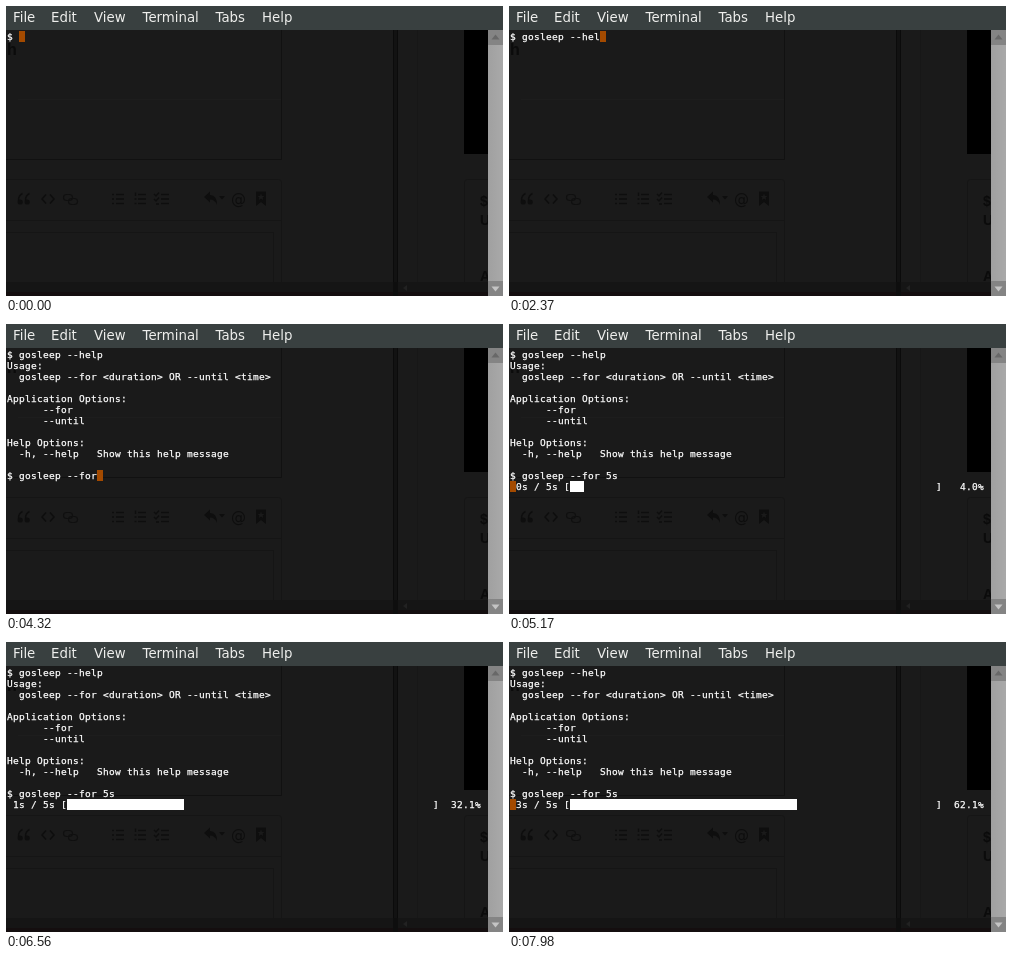
Recreate the animation shown at these times as an HTML page with a canvas. Size 497 by 290 pixels, loop 8000 ms.

```html
<!DOCTYPE html>
<html lang="en">
<head>
<meta charset="utf-8">
<title>Terminal</title>
<style>
  html, body { margin: 0; width: 100%; height: 100%; overflow: hidden; background: #1a1a1a; }
  svg, canvas { position: absolute; left: 0; top: 0; width: 497px; height: 290px; display: block; }
  .menu { font: 13.33px "DejaVu Sans", sans-serif; fill: #eeeeec; }
  .ghost { font-family: "Liberation Sans", Arial, sans-serif; font-weight: bold; fill: #0b0b0b; }
  .edge { fill: none; stroke: #151515; }
  .icon { fill: none; stroke: #0e0e0e; stroke-width: 1.5; }
  .thin { stroke: #101010; stroke-width: 1.2; }
  .solid { fill: #0e0e0e; }
</style>
</head>
<body>
<svg viewBox="0 0 497 290">
  <defs>
    <linearGradient id="thumb">
      <stop offset="0" stop-color="#a0a0a0"/>
      <stop offset="1" stop-color="#a9a9a9"/>
    </linearGradient>
  </defs>
  <rect width="497" height="290" fill="#1a1a1a"/>

  <!-- Window showing through the terminal -->
  <path class="edge" d="M0 173.5H272.5Q275.5 173.5 275.5 176.5V276M0 214.5H275M0 226.5H267.5V276"/>
  <path d="M0 153.5H275.5V24" fill="none" stroke="#111"/>
  <path d="M12 93.5H275" stroke="#1d1d1d"/>
  <text class="ghost" x="1" y="49" font-size="16">h</text>
  <rect x="387" y="24" width="5" height="266" fill="#121212"/>
  <path d="M387.5 24V290M391.5 24V290" stroke="#0b0b0b"/>
  <path d="M411.5 24V276" stroke="#171717"/>
  <rect x="458" y="24" width="24" height="124" fill="#000"/>
  <path class="edge" d="M482 173.5H461.5Q458.5 173.5 458.5 176.5V276"/>
  <g class="ghost" font-size="14">
    <text x="474" y="200">$</text>
    <text x="474" y="219">U</text>
    <text x="474" y="275">A</text>
  </g>
  <rect y="276" width="482" height="10" fill="#151515"/>
  <rect y="286" width="482" height="4" fill="#140e0f"/>
  <rect x="387" y="276" width="5" height="14" fill="#0e0e0e"/>
  <path d="M401 279V285L397 282Z" fill="#222"/>

  <!-- Editor toolbar -->
  <path class="icon" d="M16.5 187.5Q12 190 12.5 195M23.5 187.5Q19 190 19.5 195"/>
  <g class="solid">
    <circle cx="14.2" cy="196" r="2.6"/>
    <circle cx="21.2" cy="196" r="2.6"/>
  </g>
  <path class="icon" d="M40 188.5L36 193L40 197.5M44 188.5L48 193L44 197.5"/>
  <g class="icon thin">
    <rect x="57.5" y="188.5" width="9" height="6" rx="3"/>
    <rect x="62.5" y="192.5" width="9" height="6" rx="3"/>
  </g>
  <path class="icon" d="M110 188.5H118M110 193H118M110 197.5H118M132 188.5H140M132 193H140M132 197.5H140M155 188.5H163M155 193H163M155 197.5H163"/>
  <path class="icon" d="M106 188.5H108M106 193H108M106 197.5H108M129.5 186.5V190M128.5 193H130.5M128.5 197.5H130.5M148 188L150 190L153 186.5M148 193L150 195L153 191.5M150 198H153"/>
  <path class="solid" d="M198 191L204 185.5V189Q211 189 211 199Q209 193.5 204 193.5V196.5ZM213 190H219L216 193.5Z"/>
  <text class="solid" x="225" y="198" font-family="DejaVu Sans, sans-serif" font-size="15">@</text>
  <path class="solid" d="M250 185.5H260V200L255 196L250 200Z"/>
  <path d="M255 187.5L256 190H258.5L256.5 191.5L257.2 194L255 192.5L252.8 194L253.5 191.5L251.5 190H254Z" fill="#1a1a1a"/>

  <!-- Menu and scrollbar -->
  <rect width="497" height="24" fill="#394040"/>
  <g class="menu">
    <text x="7" y="16">File</text>
    <text x="45" y="16">Edit</text>
    <text x="88" y="16">View</text>
    <text x="136.5" y="16">Terminal</text>
    <text x="209.5" y="16">Tabs</text>
    <text x="256" y="16">Help</text>
  </g>
  <rect x="482" y="24" width="15" height="266" fill="#848484"/>
  <rect x="482" y="39" width="15" height="236" fill="url(#thumb)"/>
  <path d="M485.5 33.5L489.5 28.5L493.5 33.5Z" fill="#686868"/>
  <path d="M485.5 280.5L489.5 285.5L493.5 280.5Z" fill="#c4c4c4"/>
</svg>
<canvas id="term" width="497" height="290"></canvas>
<script>
const LOOP = 8000, CELL_W = 6, CELL_H = 11, LEFT = 1, TOP = 25;
const ctx = document.getElementById("term").getContext("2d");

const HELP = `Usage:
  gosleep --for <duration> OR --until <time>

Application Options:
      --for
      --until

Help Options:
  -h, --help   Show this help message

$ `;

// Terminal stream: [time, appended text]
const stream = [
  [0, "$ "],
  [1400, "g"], [1460, "o"], [1540, "s"], [1620, "l"], [1760, "eep "],
  [1900, "-"], [2060, "-"], [2210, "h"], [2280, "e"], [2340, "l"], [2410, "p"],
  [2560, "\n"], [2600, HELP],
  [3310, "g"], [3400, "o"], [3490, "s"], [3580, "l"], [3740, "eep "],
  [3970, "-"], [4060, "-"], [4150, "f"], [4230, "o"], [4320, "r"],
  [4470, " "], [4690, "5"], [4850, "s"], [4890, "\n"],
];

const cursorHidden = [
  [380, 870], [1360, 1400], [3020, 3310],
  [5380, 5870], [6360, 6850], [7340, 7830],
];

// Each tick adds 2 % to the progress bar
const ticks = [
  4980, 5080, 5170, 5270, 5360, 5460, 5600, 5680, 5770, 5850,
  5950, 6080, 6170, 6250, 6340, 6430, 6530, 6620, 6720, 6810,
  6910, 7010, 7100, 7200, 7290, 7370, 7510, 7590, 7680, 7750,
  7840, 7980,
];
const BAR_ROW = 12, BAR_COL = 10, BAR_CELLS = 61, DRIFT_TICK = 13;

const cellX = col => LEFT + col * CELL_W;
const cellY = row => TOP + row * CELL_H;

function print(text, row, col = 0) {
  [...text].forEach((ch, i) => {
    if (ch === " ") return;
    ctx.fillText(ch, cellX(col + i), cellY(row) + 9);
    ctx.strokeText(ch, cellX(col + i), cellY(row) + 9);
  });
}

function drawProgress(tick) {
  const percent = tick * 2 + (tick >= DRIFT_TICK ? 0.1 : 0);
  const eighths = Math.floor(percent / 100 * BAR_CELLS * 8);
  print(` ${Math.floor(percent / 20)}s / 5s [`, BAR_ROW);
  ctx.fillRect(cellX(BAR_COL), cellY(BAR_ROW), Math.round(eighths * CELL_W / 8), CELL_H);
  print(`]  ${percent.toFixed(1).padStart(4)}%`, BAR_ROW, BAR_COL + BAR_CELLS);
}

function draw(t) {
  const lines = stream.filter(([at]) => at <= t).map(([, text]) => text).join("").split("\n");
  const tick = ticks.filter(at => at <= t).length - 1;

  ctx.clearRect(0, 0, 497, 290);
  ctx.font = '9.5px "DejaVu Sans Mono", monospace';
  ctx.fillStyle = ctx.strokeStyle = "#fff";
  ctx.lineWidth = 0.25;
  lines.forEach((line, row) => print(line, row));
  if (tick >= 0) drawProgress(tick);

  if (!cursorHidden.some(([from, to]) => t >= from && t < to)) {
    const row = lines.length - 1;
    ctx.fillStyle = "#a34a00";
    ctx.fillRect(cellX(lines[row].length), cellY(row), CELL_W, CELL_H);
  }
}

const start = performance.now();
function frame() {
  draw((performance.now() - start) % LOOP);
  requestAnimationFrame(frame);
}
frame();
</script>
</body>
</html>
```
